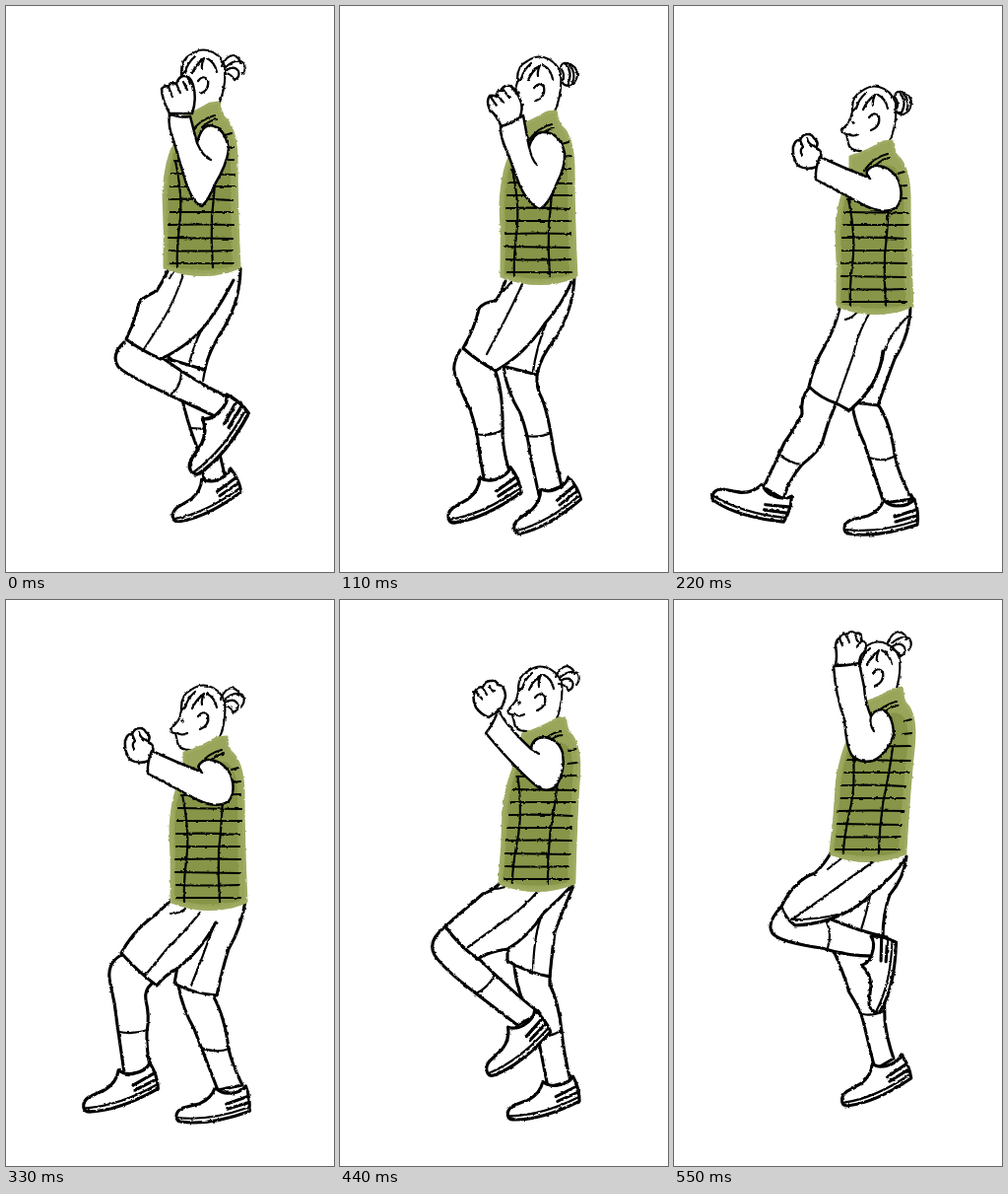
Recreate the animation shown at these times as an HTML page without scripts. Size 333 by 574 pixels, loop 0.66 s.

```html
<!DOCTYPE html>
<html lang="en">
<head>
<meta charset="utf-8">
<title>Running in place</title>
<style>
  html, body { margin: 0; width: 100%; height: 100%; overflow: hidden; background: #fff; }
  svg { display: block; width: 100%; height: 100%; }
  .pose {
    visibility: hidden;
    animation: show 660ms step-end calc((var(--i) - 6) * 110ms) infinite;
  }
  @keyframes show {
    0% { visibility: visible; }
    16.6667%, 100% { visibility: hidden; }
  }
  .ink { fill: #fff; stroke: #000; stroke-width: 3.1; stroke-linecap: round; stroke-linejoin: round; }
  .line { fill: none; stroke-width: 2.2; }
  .thin { stroke-width: 2.1; }
  .arm { stroke-width: 2.5; }
  .cloth { fill: #98a55a; stroke: #9fab62; stroke-width: 3; }
  .shade { fill: #7f8f41; opacity: .7; stroke: none; }
</style>
</head>
<body>
<svg viewBox="0 0 333 574" preserveAspectRatio="none">
  <defs>
    <filter id="rough" filterUnits="userSpaceOnUse" x="0" y="0" width="333" height="574" color-interpolation-filters="sRGB">
      <feTurbulence type="fractalNoise" baseFrequency=".22" numOctaves="2" seed="4"/>
      <feDisplacementMap in="SourceGraphic" scale="2.6" xChannelSelector="R" yChannelSelector="G"/>
    </filter>

    <!-- origin: sole below the toe -->
    <g id="shoe">
      <path d="M36-34Q32-23 20-18L3-14Q-4-11-4-5Q-4-1 0 0Q28 5 70-9Q72-22 67-35Q62-28 50-28Q41-28 36-34Z"/>
      <path class="line" d="M-2-4Q30 0 69-13"/>
      <path d="M47-17L68-24M48-12L69-18" fill="none"/>
    </g>

    <!-- origin: lower left corner -->
    <g id="vest">
      <path class="cloth" d="M1 2Q2-35 0-72Q2-110 14-128L14-149Q31-154 47-164L56-165Q58-154 61-150Q73-140 74-110Q74-60 77 2Q40 17 1 2Z"/>
      <path class="shade" d="M4 0Q6-35 4-72Q6-108 15-124Q38-146 58-139Q69-130 68-100Q68-50 70 1Q40 9 4 0Z"/>
      <path class="line" d="M6-2l65 0M6-15q30 1 64 0M5-28l65 1M5-41q34-1 66 0M6-54l64 0M6-67q30-1 64 1M7-80l65 0M8-93l64 1M11-106l60-1M62-119l9-1M62-132l7-2
        M12-106Q20-68 16-40Q13-14 14 2M53-106Q52-75 49-50Q48-24 50 2M28-135Q38-149 52-152M39-140Q48-148 54-148"/>
    </g>

    <g id="head" class="thin">
      <path d="M190 147Q178 147 177 139L175 130Q169 130 171 125Q177 119 179 115L181 107Q180 91 191 86Q199 80 208 82Q220 85 225 98Q227 118 219 137"/>
      <path class="line" d="M177 130q5 3 10 0M198 113q5-7 10-1q2 10-8 14M185 104q2-9 10-16M192 105q4-9 12-15q-3 7-2 11M207 90q8 4 10 14M181 107l5-5"/>
      <circle cx="182" cy="118" r=".8"/>
    </g>

    <g id="knot" class="thin">
      <path d="M224 92Q224 86 231 87Q241 90 241 99Q240 108 232 110Q227 110 225 105Q230 100 224 92Z"/>
      <path class="line" d="M229 88q8 9 2 20M233 89q7 8 3 18"/>
    </g>

    <!-- origin: hair tie -->
    <path id="fan" class="line" d="M-1-1Q4-12 11-12Q18-9 18-4M3 0Q12-9 21-5Q25 1 20 7M4 3Q12-2 16 4Q18 10 12 13M2 6q6 0 10 7"/>

    <g id="reach" class="arm">
      <path d="M145 163Q135 167 126 162Q120 154 121 143Q123 135 128 136Q130 130 136 130Q140 130 142 134Q148 138 144 144Q151 147 149 154Z"/>
      <path class="line" d="M128 136l3 7M135 134q1 5 5 7M131 143q-4 3-1 8M140 141l4 2"/>
      <path d="M148 153Q174 165 200 175Q190 168 203 162Q219 161 228 177Q234 194 226 204Q214 212 195 203L144 176Q143 165 148 153Z"/>
    </g>
  </defs>

  <rect width="333" height="574" fill="#fff"/>

  <g class="ink" filter="url(#rough)">
    <g class="pose" style="--i:0">
      <path d="M178 395Q184 422 193 445L203 487L223 480L216 450L214 420"/>
      <path class="line" d="M187 428L206 429"/>
      <use href="#shoe" transform="translate(175 523) rotate(-18)"/>
      <path d="M238 266Q238 297 222 325Q205 351 202 369L165 358L166 345"/>
      <path class="line" d="M209 308Q192 338 186 362M202 369L200 380"/>
      <path d="M120 341Q106 354 114 366Q122 374 165 394L212 416L229 398Q198 385 159 357"/>
      <path class="line" d="M165 395Q178 389 178 369"/>
      <use href="#shoe" transform="translate(196 474) rotate(-43) scale(1.12)"/>
      <path d="M165 267Q160 278 153 289Q138 296 135 301Q132 316 122 338Q137 349 157 358Q191 342 208 316Q219 301 231 278"/>
      <path class="line" d="M181 270Q171 299 159 319L140 348M171 268l-5 8"/>
      <use href="#head" x="-3" y="-37"/>
      <use href="#fan" x="220" y="62"/>
      <use href="#vest" x="160" y="263"/>
      <g class="arm">
        <path d="M166 109Q158 94 158 84Q162 80 165 82Q166 76 173 79Q175 72 180 71Q187 70 190 80Q194 94 189 109Z"/>
        <path class="line" d="M165 82l4 10M173 79l4 9M180 77l4 8M184 71l3 8"/>
        <path d="M166 109Q164 122 170 136L182 177Q190 201 199 203Q206 196 212 181Q224 161 226 146Q223 123 207 121Q198 122 194 139L187 112Q175 114 166 109Z"/>
        <path class="line" d="M194 139Q200 153 208 156"/>
      </g>
    </g>

    <g class="pose" style="--i:1">
      <path d="M166 366Q169 390 183 413Q191 434 193 455L202 496L225 487L217 452Q212 416 205 398Q199 388 200 374"/>
      <path class="line" d="M189 436Q204 438 214 433"/>
      <use href="#shoe" transform="translate(183 535) rotate(-22)"/>
      <path d="M238 275Q237 306 220 335Q203 356 200 374L165 365L165 350"/>
      <path class="line" d="M209 322Q199 348 196 371"/>
      <path d="M122 349Q112 366 118 376Q125 396 132 409Q140 433 141 450L147 485L174 478Q166 455 165 435Q166 392 158 371"/>
      <path class="line" d="M138 434Q153 437 165 430"/>
      <use href="#shoe" transform="translate(116 524) rotate(-17) scale(1.06)"/>
      <path d="M168 279Q163 292 158 299Q146 300 141 307Q137 326 125 347Q138 359 158 370Q188 353 208 322Q224 305 235 280"/>
      <path class="line" d="M185 282Q174 306 165 323L149 353M174 280l-8 9"/>
      <use href="#head" x="-1" y="-30"/>
      <use href="#knot" y="-29"/>
      <use href="#vest" x="163" y="272"/>
      <g class="arm">
        <path d="M164 123Q160 112 152 105Q148 96 152 91Q157 90 159 92Q158 85 164 86Q165 80 173 81Q180 86 184 98Q186 108 181 115Z"/>
        <path class="line" d="M152 91l7 10M159 89l7 9M165 84l7 9M174 81l5 8"/>
        <path d="M163 122Q162 132 171 151L182 181Q191 201 203 206Q213 200 220 180Q229 163 228 149Q223 127 205 128Q196 129 192 143L186 111Q174 120 163 122Z"/>
        <path class="line" d="M192 143Q195 157 200 161"/>
      </g>
    </g>

    <g class="pose" style="--i:2">
      <path d="M181 405Q184 424 193 443L213 504L242 500Q228 477 224 455Q220 423 207 404"/>
      <path class="line" d="M198 458Q213 463 225 456"/>
      <use href="#shoe" x="177" y="535"/>
      <path d="M240 304Q240 332 224 358Q216 379 207 405L182 402L178 411L166 402"/>
      <path class="line" d="M237 315Q213 340 212 358Q203 389 178 410"/>
      <path d="M137 387Q128 398 130 414Q124 426 112 443Q105 458 91 488L111 500Q117 480 130 465Q149 450 151 441Q156 422 164 404"/>
      <path class="line" d="M108 456Q119 464 130 465"/>
      <use href="#shoe" transform="translate(41 502) rotate(24) scale(1.04)"/>
      <path d="M168 307Q163 328 153 345Q142 363 137 386Q149 398 165 403L178 410Q209 385 212 350"/>
      <path class="line" d="M198 312Q186 333 182 354L165 402M186 310q-4 6-12 8"/>
      <use href="#head"/>
      <use href="#knot"/>
      <use href="#vest" x="165" y="302"/>
      <use href="#reach"/>
    </g>

    <g class="pose" style="--i:3">
      <path d="M175 391Q179 414 191 435L215 497L240 492Q229 470 226 455Q222 422 210 401"/>
      <path class="line" d="M198 454Q213 460 227 455"/>
      <use href="#shoe" transform="translate(177 529) rotate(-1)"/>
      <path d="M243 305Q239 332 226 354Q219 376 214 401Q190 399 171 389L174 372"/>
      <path class="line" d="M210 333Q200 361 188 391"/>
      <path d="M117 360Q101 369 106 389Q111 410 113 431L121 486L148 482Q142 456 143 438Q146 422 142 406Q140 396 148 389"/>
      <path class="line" d="M115 438Q129 441 144 436"/>
      <use href="#shoe" transform="translate(84 519) rotate(-11) scale(1.05)"/>
      <path d="M168 304Q155 317 143 326Q128 338 117 358Q134 377 153 391Q162 380 172 375Q198 356 213 327"/>
      <path class="line" d="M197 317Q181 337 164 353L141 381M182 313q-5 5-15 5"/>
      <use href="#head" x="-3" y="5"/>
      <use href="#fan" x="219" y="101"/>
      <use href="#vest" x="167" y="304"/>
      <use href="#reach"/>
    </g>

    <g class="pose" style="--i:4">
      <path d="M177 371Q180 404 198 428L211 494L234 488Q227 459 225 437Q222 408 213 390L213 380"/>
      <path class="line" d="M205 442Q215 443 225 436"/>
      <use href="#shoe" transform="translate(175 527) rotate(-8)"/>
      <path d="M237 290Q226 315 218 337Q215 360 213 382Q188 377 170 366L170 350"/>
      <path class="line" d="M206 317Q197 337 196 375"/>
      <path d="M107 331Q88 346 96 360Q105 374 138 399L180 431L203 419Q180 402 140 363"/>
      <path class="line" d="M138 399Q151 393 157 380"/>
      <use href="#shoe" transform="translate(156 482) rotate(-30) scale(1.03)"/>
      <path d="M165 284Q156 295 145 298Q125 315 107 331Q121 351 140 364Q149 357 170 354Q191 342 207 317Q222 304 235 290"/>
      <path class="line" d="M202 294Q185 314 163 328L130 352M170 289q-5 4-14 4"/>
      <use href="#head" x="0" y="-14"/>
      <use href="#fan" x="220" y="79"/>
      <use href="#vest" transform="translate(161 285) skewX(-4)"/>
      <g class="arm">
        <path d="M151 119Q143 116 138 109Q133 98 138 91Q142 87 145 89Q147 81 154 82Q159 81 160 86Q167 86 168 97Q167 107 161 112Z"/>
        <path class="line" d="M138 93l6 7M145 89l4 7M152 87q0 5 5 5"/>
        <path d="M161 111Q167 126 194 151Q195 140 207 139Q222 141 226 155Q229 173 220 188Q211 197 200 189Q181 174 148 135Q155 127 161 111Z"/>
        <path class="line" d="M194 151l8 5"/>
      </g>
    </g>

    <g class="pose" style="--i:5">
      <path d="M159 350Q170 371 178 398Q190 417 192 427L204 476L223 465Q216 445 214 426L212 340"/>
      <path class="line" d="M192 420Q202 422 213 417"/>
      <use href="#shoe" transform="translate(176 513) rotate(-16)"/>
      <path d="M236 260Q234 281 219 299Q212 318 212 342L160 335L162 315"/>
      <path class="line" d="M199 300Q195 319 190 334"/>
      <path d="M109 311Q93 328 100 338Q107 347 150 353Q178 362 209 361L216 342Q188 336 160 324"/>
      <path class="line" d="M156 353Q161 339 154 324"/>
      <use href="#shoe" transform="translate(210 416) rotate(-70)"/>
      <path d="M160 255Q152 269 143 277Q122 284 109 311Q113 323 123 330Q149 329 170 319Q190 310 200 298Q222 282 235 262"/>
      <path class="line" d="M203 265Q178 282 154 300L120 324Q146 324 166 319M170 262l-14 11"/>
      <use href="#head" x="4" y="-39"/>
      <use href="#fan" x="218" y="44"/>
      <use href="#vest" transform="translate(158 255) skewX(-6)"/>
      <g class="arm">
        <path d="M164 66Q166 57 164 47Q165 39 168 39Q170 33 175 35Q180 30 184 34Q191 32 190 40Q198 45 193 53Q188 56 188 66Z"/>
        <path class="line" d="M168 39l3 7M175 35l3 8M184 34l2 8M190 42l-4 5"/>
        <path d="M162 67Q164 97 173 121Q175 150 181 158Q190 166 202 163Q217 156 223 136Q222 114 210 111Q203 112 200 118Q194 104 193 88L188 64Q174 67 162 67Z"/>
        <path class="line" d="M200 118q-2 8 3 15"/>
      </g>
    </g>
  </g>
</svg>
</body>
</html>
```
